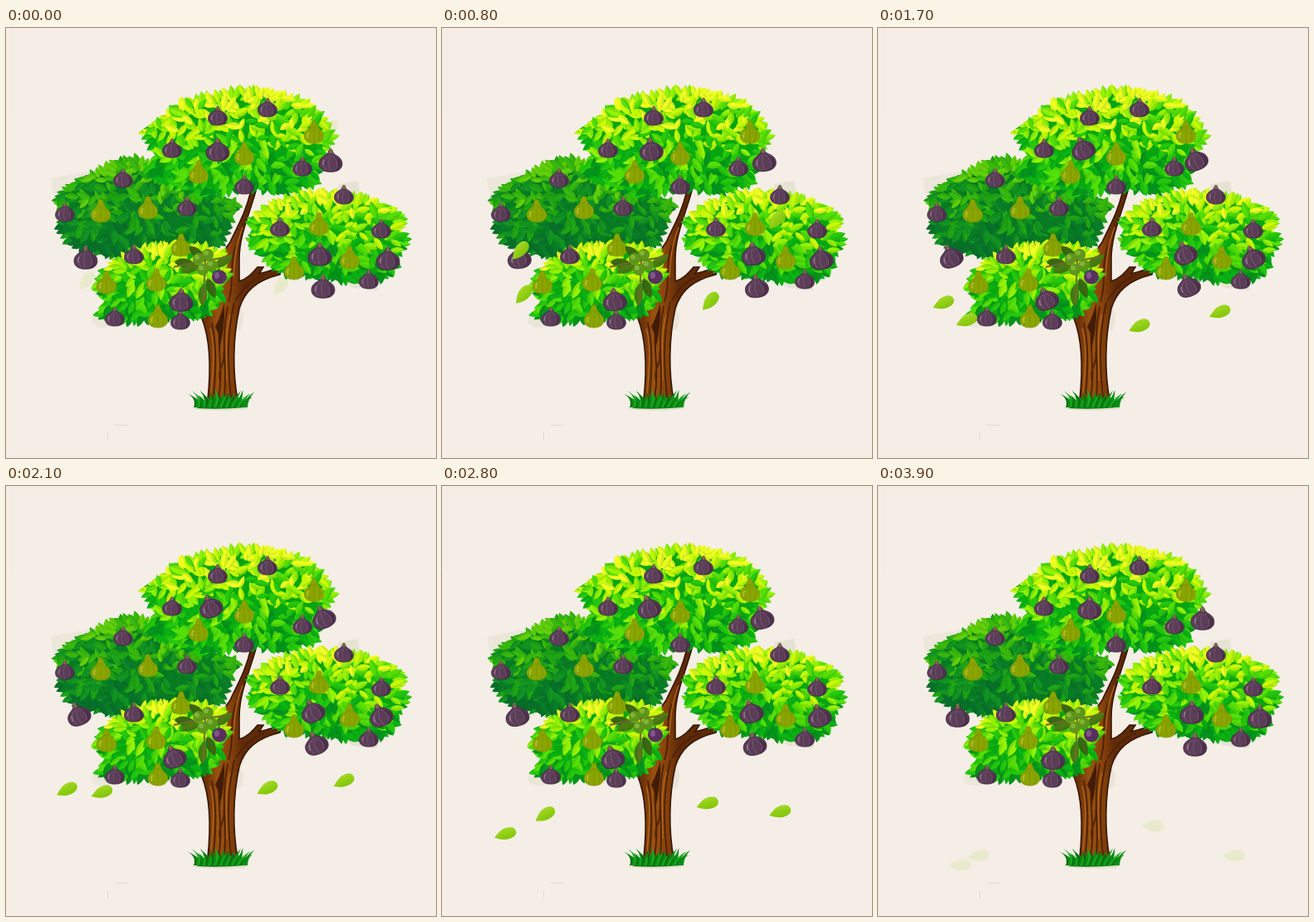
An HTML page with a canvas for the animation above (4000 ms loop, 518 by 518 pixels).

```html
<!DOCTYPE html>
<html lang="en">
<head>
<meta charset="utf-8">
<title>Fig tree</title>
<style>
  html, body { margin: 0; width: 100%; height: 100%; overflow: hidden; background: #f5eee6; }
  canvas { display: block; }
</style>
</head>
<body>
<canvas id="stage" width="518" height="518"></canvas>
<script>
const SIZE = 518, LOOP = 4000, STEP = 100;
const stage = document.getElementById('stage').getContext('2d');
const scenery = document.createElement('canvas');
scenery.width = scenery.height = SIZE;
const art = scenery.getContext('2d');

let seed = 11;
const rand = () => (seed = (seed * 16807) % 2147483647) / 2147483647;
const spread = r => (rand() * 2 - 1) * r;

const leafShape = new Path2D('M-9 0C-5 -5 3 -5.5 10 0C3 5.5 -5 5 -9 0Z');
const fallShape = new Path2D('M-14 1C-8 -3 -4 -7 3 -7C10 -7 13 -4 13 0C13 5 8 7 2 7C-5 7 -9 4 -14 1Z');
const figShape = new Path2D('M-2 -12L2 -12C2 -6 12 -7 12.5 2C12.5 8 8 11 0 11C-8 11 -12.5 8 -12.5 2C-12 -7 -2 -6 -2 -12Z');
const pearShape = new Path2D('M-2 -14L2 -14C4 -9 4 -6 8 -3C14 1 14 13 0 13C-14 13 -14 1 -8 -3C-4 -6 -4 -9 -2 -14Z');

function placed(g, x, y, angle, scale, draw) {
  g.save();
  g.translate(x, y);
  g.rotate(angle);
  g.scale(scale, scale);
  draw();
  g.restore();
}

function fill(g, d, color) {
  g.fillStyle = color;
  g.fill(new Path2D(d));
}

function stroke(g, d, color, width) {
  g.strokeStyle = color;
  g.lineWidth = width;
  g.stroke(new Path2D(d));
}

function foliageLeaf(x, y, angle, scale, color) {
  placed(art, x, y, angle, scale, () => {
    art.fillStyle = color;
    art.fill(leafShape);
    fill(art, 'M-9 0C-4 1 4 1 10 0C3 5.5 -5 5 -9 0Z', 'rgba(0,90,10,.13)');
  });
}

// Fills an outline with leaves, shaded from the first palette colour (top) to the last (bottom).
function clump(outline, base, palette) {
  const nums = outline.split(' ').map(Number), pts = [];
  for (let i = 0; i < nums.length; i += 2) pts.push([nums[i], nums[i + 1]]);
  const xs = pts.map(p => p[0]), ys = pts.map(p => p[1]);
  const left = Math.min(...xs), right = Math.max(...xs);
  const top = Math.min(...ys), bottom = Math.max(...ys);
  const cx = (left + right) / 2, cy = (top + bottom) / 2;
  const shape = new Path2D('M' + pts.join('L') + 'Z');
  art.fillStyle = base;
  art.fill(shape);

  const leafAt = (x, y, noise, scale) => {
    const depth = (y - top) / (bottom - top) * .75 + .12 + spread(.3);
    const index = Math.floor(Math.max(0, Math.min(.99, depth)) * palette.length);
    foliageLeaf(x, y, Math.atan2((y - cy) * 1.5, x - cx) + spread(noise), scale, palette[index]);
  };

  pts.forEach(([x, y], i) => {
    const [nx, ny] = pts[(i + 1) % pts.length];
    const count = Math.ceil(Math.hypot(nx - x, ny - y) / 7);
    for (let k = 0; k < count; k++) {
      const f = k / count;
      leafAt(x + (nx - x) * f, y + (ny - y) * f, .7, .75 + rand() * .3);
    }
  });
  for (let y = bottom; y > top; y -= 8)
    for (let x = left; x < right; x += 9) {
      const px = x + spread(5), py = y + spread(5);
      if (art.isPointInPath(shape, px, py)) leafAt(px, py, 1.3, .75 + rand() * .4);
    }
}

function purpleFig(g, x, y, scale = 1, angle = 0) {
  placed(g, x, y, angle, scale, () => {
    g.fillStyle = '#5b3d57';
    g.fill(figShape);
    fill(g, 'M3 -5C13 -4 16 8 3 11C9 6 9 0 3 -5Z', 'rgba(45,22,48,.35)');
    stroke(g, 'M-2 -6C-9 -3 -9 4 -5 9M0 -7C-3 0 -2 5 0 10M2 -6C8 -2 8 4 6 8', 'rgba(150,118,148,.5)', .8);
    stroke(g, 'M-7 -2Q-9 1 -8 4', 'rgba(190,165,185,.5)', 1.4);
    g.strokeStyle = '#452b47';
    g.lineWidth = .8;
    g.stroke(figShape);
    fill(g, 'M-1.5 -14H1.5L2 -9H-2Z', '#7b6a4c');
  });
}

function greenFig(x, y) {
  placed(art, x, y, 0, 1, () => {
    art.fillStyle = '#8ba500';
    art.fill(pearShape);
    stroke(art, 'M-1 -8C-9 0 -8 6 -5 11M0 -8V12M1 -8C9 0 8 6 5 11', 'rgba(98,125,0,.55)', .8);
    stroke(art, 'M-6 0Q-9 3 -7 7', 'rgba(195,208,70,.7)', 1.8);
    art.strokeStyle = '#7d9200';
    art.lineWidth = .7;
    art.stroke(pearShape);
  });
}

function trunk() {
  const bark = art.createLinearGradient(242, 0, 285, 0);
  bark.addColorStop(0, '#6d3209');
  bark.addColorStop(.3, '#9a5110');
  bark.addColorStop(.65, '#88430b');
  bark.addColorStop(1, '#5e2a08');
  const body = 'M243 448C247 410 246 375 236 350L250 320L258 275L270 258C278 240 288 225 295 196L301 196'
    + 'C293 225 281 250 281 278L281 305C291 302 297 295 303 288L310 288L305 296C315 294 323 290 332 289'
    + 'L330 297C302 304 288 316 281 338C273 375 273 415 279 448Z';
  fill(art, body, bark);
  stroke(art, body, '#351604', 1.6);
  stroke(art, 'M250 445C253 410 254 385 248 355M256 445C263 408 252 385 259 345M263 445C267 405 258 380 267 335'
    + 'M271 445C267 405 266 370 275 330M268 330C276 305 268 285 277 262M277 328C285 313 297 303 311 298'
    + 'M258 425C254 410 266 402 262 390', '#4d2106', 1.8);
  stroke(art, 'M247 440C250 405 252 380 246 362M266 425C266 395 263 370 270 345M274 300C276 275 276 265 285 240', '#b66a1c', 1.2);
  fill(art, 'M252 360C257 350 259 345 263 332C264 355 260 375 257 388C258 375 256 367 252 360Z', '#431c05');
}

function grass() {
  fill(art, 'M229 458Q258 442 289 457Q258 460 229 458Z', '#087a12');
  for (let i = 0; i < 26; i++) {
    const f = i / 25, x = 230 + f * 57, lean = (f - .5) * 24 + spread(4);
    const tip = 433 + rand() * 10 + Math.abs(f - .5) * 5;
    fill(art, `M${x - 4} 457Q${x} 447 ${x + lean} ${tip}Q${x + 4} 448 ${x + 4} 457Z`,
      ['#07700f', '#0a8d16', '#19a61c'][i % 3]);
  }
}

function smudge(x, y, rx, ry, color) {
  art.fillStyle = color;
  art.beginPath();
  art.ellipse(x, y, rx, ry, 0, 0, 7);
  art.fill();
}

function twig() {
  [[215, 283, .1], [222, 290, -.3], [230, 271, .7], [237, 322, 1.6], [247, 313, 1.2], [262, 281, -.6]]
    .forEach(([x, y, angle], i) => foliageLeaf(x, y, angle, 1.35, i % 2 ? '#4c7c13' : '#3c6812'));
  stroke(art, 'M202 288Q235 280 268 276M240 280L238 330', '#6b6b2c', 2);
  for (const [x, y] of [[232, 278], [243, 273], [237, 291], [248, 286]]) {
    smudge(x, y, 7, 7, '#5e951b');
    smudge(x - 2, y - 2, 3, 3, '#82b535');
  }
  smudge(257, 300, 9, 8.5, '#59305f');
  smudge(254, 298, 3, 4, '#80558a');
}

function paintScenery() {
  art.fillStyle = '#f5eee6';
  art.fillRect(0, 0, SIZE, SIZE);
  fill(art, 'M54 181L105 172L150 154L140 180L58 205Z', '#ebe7da');
  fill(art, 'M400 188L424 184L428 206L400 206ZM395 300L450 296L447 316L418 313Z', '#e6e3d4');
  smudge(118, 352, 15, 9, '#ebe6da');
  smudge(281, 350, 5, 14, '#ebe4d9');
  smudge(258, 458, 34, 3, '#e6e2d2');
  stroke(art, 'M131 478.5H147M122.5 487V497', '#e3dacf', 1);
  stroke(art, 'M6.5 0V104', '#f1e9e1', 1);

  const bright = ['#efff22', '#c8fb08', '#94f207', '#54df08', '#25c80e', '#0bb214', '#04951c'];
  clump('62 207 78 192 105 177 132 165 158 160 190 180 240 200 276 213 267 235 258 258 220 262 180 268 142 273 118 269 92 266 75 256 67 238 77 225',
    '#087b22', ['#62cf0b', '#39b90e', '#1fa516', '#129323', '#0a7d28', '#08702b']);
  trunk();
  clump('168 125 184 115 200 100 217 90 242 85 266 80 285 76 310 77 335 83 355 89 368 96 380 111 392 132 382 146 376 168 372 184 353 190 335 197 312 192 288 190 256 198 236 201 212 190 188 183 170 170 184 152 174 136',
    '#07a512', bright);
  clump('295 236 307 224 332 210 356 202 385 200 412 203 440 209 463 219 475 229 473 245 481 255 470 275 465 292 444 303 415 303 390 298 365 296 338 294 320 282 296 257 304 247',
    '#0aa511', bright);
  clump('110 309 120 293 138 279 166 266 200 262 240 266 260 274 266 299 253 314 260 324 241 341 224 346 204 346 176 350 142 352 114 344 122 330',
    '#0ba710', bright);
  grass();

  [[371, 126], [287, 152], [232, 174], [171, 217], [114, 221], [211, 262], [121, 307], [181, 304],
   [183, 348], [377, 237], [414, 277], [347, 290]].forEach(p => greenFig(...p));
  twig();
  [[255, 107], [315, 97], [200, 146], [357, 168], [287, 190], [141, 182], [71, 223], [218, 216],
   [154, 274], [330, 241], [407, 202], [452, 243], [437, 304], [131, 349], [210, 353]]
    .forEach(([x, y]) => purpleFig(art, x, y, .92));
}

const swaying = [[255, 148], [391, 161], [96, 278], [378, 274], [460, 279], [382, 313], [211, 329]];

const times = [0, 800, 1300, 1700, 2400, 3200, 3900];
const turn = [-52, -46, -30, -20, -25, -2, 2];
const falling = [
  { x: [107, 94, 86, 79, 72, 84, 99], y: [218, 268, 299, 331, 390, 442, 456], turn },
  { x: [97, 98, 101, 107, 121, 125, 121], y: [304, 321, 336, 352, 381, 411, 445], turn: [-50, -46, -28, -20, -20, -36, -8] },
  { x: [330, 323, 317, 315, 316, 325, 332], y: [311, 329, 348, 359, 369, 396, 409], turn },
  { x: [390, 403, 414, 412, 405, 413, 429], y: [122, 231, 299, 342, 365, 420, 445], turn }
];

// Smooth curve through the values at the key times.
function curve(values, t) {
  let i = 0;
  while (i < times.length - 2 && t >= times[i + 1]) i++;
  const slope = k => {
    const a = Math.max(0, k - 1), b = Math.min(times.length - 1, k + 1);
    return (values[b] - values[a]) / (times[b] - times[a]);
  };
  const span = times[i + 1] - times[i], u = (t - times[i]) / span, v = 1 - u;
  return v * v * ((1 + 2 * u) * values[i] + u * span * slope(i))
    + u * u * ((3 - 2 * u) * values[i + 1] - v * span * slope(i + 1));
}

const leafTint = stage.createLinearGradient(0, -7, 0, 7);
leafTint.addColorStop(0, '#a5d82d');
leafTint.addColorStop(.5, '#91cf12');
leafTint.addColorStop(1, '#82c50c');

function frame(now) {
  const t = Math.floor(now % LOOP / STEP) * STEP;
  stage.drawImage(scenery, 0, 0);

  const sway = (1 - Math.cos(t / LOOP * Math.PI * 2)) / 2;
  for (const [x, y] of swaying) purpleFig(stage, x - 8.5 * sway, y - 2 * sway, 1.12, -.38 * sway);

  stage.globalAlpha = Math.min(1, .12 + t / 700, .12 + (3900 - t) / 500);
  for (const leaf of falling)
    placed(stage, curve(leaf.x, t), curve(leaf.y, t), curve(leaf.turn, t) * Math.PI / 180, 1, () => {
      stage.fillStyle = leafTint;
      stage.fill(fallShape);
    });
  stage.globalAlpha = 1;
  requestAnimationFrame(frame);
}

paintScenery();
requestAnimationFrame(frame);
</script>
</body>
</html>
```
